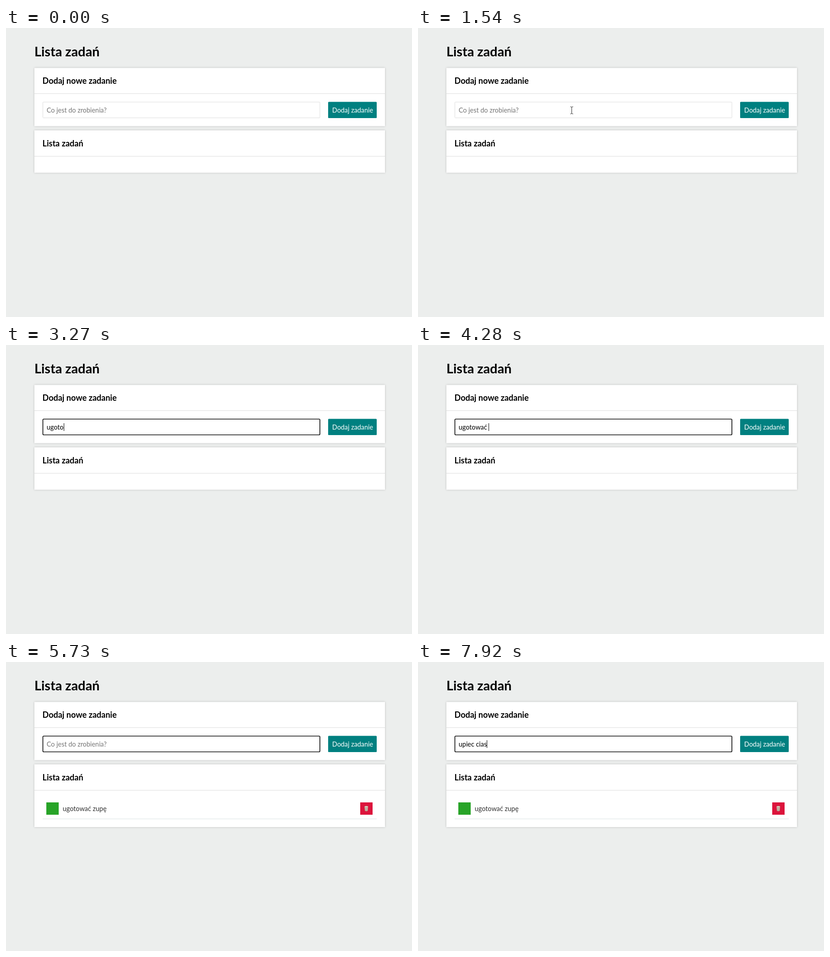
These frames come from a looping animation (886 px wide and 632 px high, 8000 ms). An HTML page:

```html
<!DOCTYPE html>
<html lang="pl">
<head>
<meta charset="utf-8">
<title>Lista zadań</title>
<style>
  html, body { margin: 0; width: 100%; height: 100%; overflow: hidden; background: #eceeed; }
  svg { display: block; }
  text { font: 14.4px Lato, sans-serif; white-space: pre; }
  .title { font-size: 28.8px; font-weight: 700; }
  .head { font-size: 18px; font-weight: 700; }
  .card { fill: #fff; filter: drop-shadow(0 0 2px rgba(0, 0, 0, .2)); }
  .rule { fill: #ddd; }
  .hint { fill: #757575; }
  .hidden { visibility: hidden; }
</style>
</head>
<body>
<svg width="886" height="632" viewBox="0 0 886 632">
  <text class="title" x="62" y="62">Lista zadań</text>

  <rect class="card" x="62" y="87.4" width="765" height="127.2"/>
  <rect class="rule" x="62" y="143" width="765" height="1"/>
  <text class="head" x="79.6" y="122">Dodaj nowe zadanie</text>
  <rect id="field" x="80.5" y="162" width="604.5" height="34.5" rx="1" fill="#fff" stroke="#ddd"/>
  <text id="hint" class="hint" x="88.8" y="185">Co jest do zrobienia?</text>
  <text id="typed" x="88.8" y="185"></text>
  <rect id="caret" y="171" width="1" height="17"/>
  <rect x="703" y="161.5" width="106" height="35.5" rx="1.5" fill="#008080"/>
  <text x="711.8" y="185" fill="#fff">Dodaj zadanie</text>

  <rect id="list" class="card" x="62" y="223.8" width="765" height="92.7"/>
  <rect class="rule" x="62" y="280" width="765" height="1"/>
  <text class="head" x="79.6" y="259">Lista zadań</text>

  <g id="task" class="hidden">
    <rect x="88" y="307" width="27" height="27" fill="#28a428"/>
    <text x="123.8" y="326" fill="#333">ugotować zupę</text>
    <rect x="773" y="307" width="27" height="27" fill="#dc143c"/>
    <g fill="#d8cbb9" stroke="#9d7d72" stroke-width=".6">
      <path d="M782.6 316.5l.8 9q2.9 1.6 5.8 0l.8-9z"/>
      <path d="M784.5 318l.4 7.5M786.3 318.2v8M788.1 318l-.4 7.5"/>
      <ellipse cx="786.3" cy="316.4" rx="3.8" ry="1.4" fill="#eee3d3"/>
    </g>
    <rect x="80" y="342.5" width="729" height="1.2" fill="#dfe8e8"/>
  </g>

  <path id="arrow" d="M0 0V11.8L2.8 9.2L4.8 13.6L6.8 12.7L4.8 8.4H8.4Z" fill="#fff" stroke="#000" stroke-width=".9"/>
  <path id="beam" d="M-3 -8Q0 -8 0 -6V6Q0 8 -3 8M3 -8Q0 -8 0 -6M0 6Q0 8 3 8" fill="none" stroke="#222"/>
</svg>
<script>
  const LOOP = 8000, FOCUS = 1570, ADDED = 5730;
  const phrases = [
    { text: 'ugotować zupę', at: [2540, 2940, 3050, 3160, 3270, 3550, 3730, 4060, 4280, 4390, 4530, 4790, 5140] },
    { text: 'upiec cias', at: [6400, 6600, 6790, 6930, 7130, 7260, 7390, 7520, 7720, 7920] }
  ];
  const caretOn = [[FOCUS, 2080], [2540, 5670], [6200, LOOP]];
  const get = id => document.getElementById(id);
  const [field, hint, typed, caret, list, task, arrow, beam] =
    ['field', 'hint', 'typed', 'caret', 'list', 'task', 'arrow', 'beam'].map(get);
  const show = (el, on) => el.classList.toggle('hidden', !on);
  const within = (t, a, b) => t >= a && t < b;
  const mix = (a, b, p) => a + (b - a) * p;

  // Pointer position advances in discrete steps, as a screen recorder samples it.
  function stepped(t, start, end, steps) {
    const k = Math.floor((t - start) / (end - start) * (steps - 1) + 1e-6);
    return Math.max(0, Math.min(1, k / (steps - 1)));
  }

  function drawPointer(t) {
    const p = stepped(t, 730, 1140, 7);
    const ease = 1 - (1 - p) ** 2;
    let x = mix(843.5, 344.9, ease), y = mix(612.5, 205.9, ease);
    if (t >= 1340) { x = 342; y = 199; }
    arrow.setAttribute('transform', `translate(${x} ${y})`);
    show(arrow, within(t, 730, 1420));
    beam.setAttribute('transform', `translate(${t < 1500 ? 338.5 : 335.5} ${t < 1500 ? 184 : 180})`);
    show(beam, within(t, 1420, 1810));
  }

  function drawField(t) {
    const focused = t >= FOCUS;
    field.setAttribute('stroke', focused ? '#101010' : '#ddd');
    field.setAttribute('stroke-width', focused ? 1.7 : 1);
    field.setAttribute('rx', focused ? 2 : 1);

    const { text, at } = phrases[t < ADDED ? 0 : 1];
    typed.textContent = text.slice(0, at.filter(ms => ms <= t).length);
    show(hint, !typed.textContent);
    const width = typed.textContent ? typed.getComputedTextLength() : 0;
    caret.setAttribute('x', Math.round(88.8 + width));
    show(caret, caretOn.some(([a, b]) => within(t, a, b)));
  }

  function draw(t) {
    drawPointer(t);
    drawField(t);
    show(task, t >= ADDED);
    list.setAttribute('height', t < ADDED ? 92.7 : 137.2);
  }

  const start = performance.now();
  function tick() {
    draw((performance.now() - start) % LOOP);
    requestAnimationFrame(tick);
  }
  tick();
</script>
</body>
</html>
```
